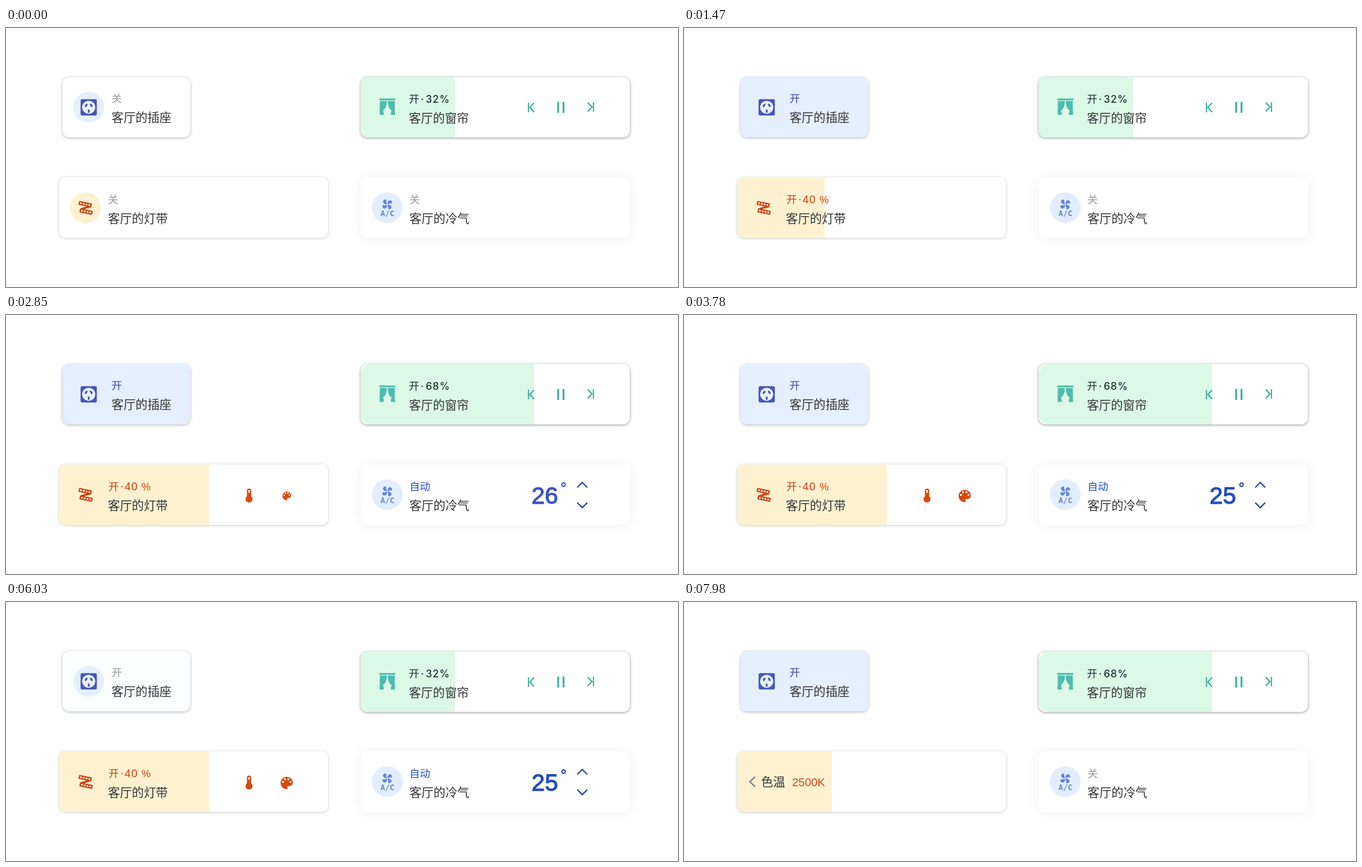
Write an HTML page with a canvas that moves like this. It is 1200 px wide and 464 px high and loops after 8000 ms.

```html
<!DOCTYPE html>
<html lang="zh-CN">
<head>
<meta charset="utf-8">
<title>智能家居卡片</title>
<style>
html, body { margin: 0; width: 100%; height: 100%; overflow: hidden; background: #fff; }
canvas { display: block; width: 1200px; height: 464px; }
</style>
</head>
<body>
<canvas id="stage"></canvas>
<script>
const W = 1200, H = 464, LOOP = 8000, CYCLE = 4800, CUT = 4860;
const canvas = document.getElementById('stage');
const dpr = window.devicePixelRatio || 1;
canvas.width = W * dpr;
canvas.height = H * dpr;
const c = canvas.getContext('2d', { alpha: false });

const CJK = '"Noto Sans CJK SC", "Noto Sans CJK", sans-serif';
const SANS = '"Liberation Sans", Arial, sans-serif';
const INTER = 'Inter, "Liberation Sans", sans-serif';
const MONO = '"DejaVu Sans Mono", monospace';
const INK = '#343436', GREY = '#999', BLUE = '#e4efff', YELLOW = '#fef1d0', MINT = '#dcf9e8';
const TEAL = '#40b09f', RUST = '#cf3f10', NAVY = '#234db8';

const clamp = v => Math.max(0, Math.min(1, v));
const ramp = (t, a, b) => clamp((t - a) / (b - a));
const ease = (t, a, b) => { const k = ramp(t, a, b); return k * k * (3 - 2 * k); };
const mix = (a, b, k) => a + (b - a) * k;

function text(str, x, y, font, color, spacing = 0) {
  c.font = font;
  c.letterSpacing = spacing + 'px';
  c.fillStyle = color;
  c.fillText(str, x, y);
}
const label = (str, x, y) => text(str, x, y, `400 21.4px ${CJK}`, INK);
const status = (str, x, y, color) => text(str, x, y, `400 18.5px ${CJK}`, color);

function disc(x, y, r, color) {
  c.fillStyle = color;
  c.beginPath();
  c.arc(x, y, r, 0, Math.PI * 2);
  c.fill();
}

function line(points, width, color) {
  c.strokeStyle = color;
  c.lineWidth = width;
  c.beginPath();
  points.forEach(([x, y]) => c.lineTo(x, y));
  c.stroke();
}

function box(x, y, w, h, r, color) {
  c.fillStyle = color;
  c.beginPath();
  c.roundRect(x, y, w, h, r);
  c.fill();
}

// White card with a soft shadow; paint() is clipped to its rounded outline.
function card(x, y, w, h, r, shadow, blur, dy, paint) {
  c.save();
  c.shadowColor = `rgba(0,0,0,${shadow})`;
  c.shadowBlur = blur * dpr;
  c.shadowOffsetY = dy * dpr;
  box(x, y, w, h, r, '#fff');
  c.restore();
  c.save();
  c.beginPath();
  c.roundRect(x, y, w, h, r);
  c.clip();
  paint();
  c.restore();
}

function faded(alpha, paint) {
  if (alpha <= 0) return;
  c.save();
  c.globalAlpha *= alpha;
  paint();
  c.restore();
}

function at(x, y, scale, angle, paint) {
  c.save();
  c.translate(x, y);
  c.rotate(angle);
  c.scale(scale, scale);
  paint();
  c.restore();
}

const blade = new Path2D('M.5-10C5-10 5.11-6.43 2.75-5.25C1.76-4.76 1.32-3.71 1.13-2.78L0 0L-1.86-2.35C-3.85-6.04-3.06-10 .5-10Z');
const thermo = new Path2D('M3 1V-7A3 3 0 0 0-3-7V1A5 5 0 1 0 3 1ZM0-8A1 1 0 0 1 1-7V-4H-1V-7A1 1 0 0 1 0-8Z');
const palette = new Path2D('M0-9A9 9 0 0 0-9 0A9 9 0 0 0 0 9A1.5 1.5 0 0 0 1.5 8C1.5 7.6 1.35 7.26 1.1 7C.88 6.73 .73 6.38 .73 6A1.5 1.5 0 0 1 2.23 4.5H4A5 5 0 0 0 9-.5C9-5.42 4.97-9 0-9Z');
[[5.5, -1.5], [2.5, -5.5], [-2.5, -5.5], [-5.5, -1.5]].forEach(([x, y]) => {
  palette.moveTo(x + 1.5, y);
  palette.arc(x, y, 1.5, 0, Math.PI * 2);
});
const drape = new Path2D('M-13.2-10.5H-.8C-1.2-1-3.5 4-8 6.6C-6.8 8.5-6.2 11-6.2 14.5H-13.8Z');

function socketIcon() {
  box(133.2, 127.4, 29, 29.4, 3, '#4656b8');
  disc(147.7, 142.1, 11.7, '#e8f1ff');
  line([[144.6, 136], [141.6, 141.2]], 3.4, '#4656b8');
  line([[150.8, 136], [153.8, 141.2]], 3.4, '#4656b8');
  line([[147.7, 146.2], [147.7, 151.8]], 3.2, '#4656b8');
}

function curtainIcon() {
  box(666.6, 126.2, 28.6, 3.2, 0, '#4dbcad');
  at(680.9, 141.2, 1, 0, () => {
    c.fillStyle = '#4dbcad';
    c.fill(drape);
    c.scale(-1, 1);
    c.fill(drape);
  });
}

function stripIcon() {
  line([[151, 319.5], [133.5, 324.7]], 3.4, RUST);
  [[141.4, 315.6], [143, 329]].forEach(([x, y]) => at(x, y, 1, 0.21, () => {
    box(-11.6, -3.6, 23.2, 7.2, 0.6, RUST);
    for (let i = 0; i < 4; i++) box(-9.3 + i * 5.1, -1.5, 3.2, 3, 0.4, '#fff3dc');
  }));
}

function acIcon() {
  disc(680.8, 321.8, 27.5, '#e2eeff');
  c.fillStyle = '#5f86dc';
  for (let i = 0; i < 4; i++) {
    at(680.8, 316, 0.98, Math.PI / 4 + i * Math.PI / 2, () => c.fill(blade));
  }
  disc(680.8, 316, 1.2, '#e2eeff');
  text('A/C', 668.8, 336.6, `700 13.6px ${MONO}`, '#5f86dc');
}

function socket(t) {
  const on = t >= 1220;
  const k = ramp(t, 1205, 1400);
  card(101, 88, 228, 108, 12, 0.3, 5, 1, () => {
    faded(k, () => box(101, 88, 228, 108, 0, BLUE));
    disc(147.8, 142, 27.5, BLUE);
    socketIcon();
    status(on ? '开' : '关', 188.5, 133, GREY);
    if (on) faded(ramp(t, 1240, 1380), () => status('开', 188.5, 133, '#4656b8'));
    label('客厅的插座', 188.5, 167.5);
  });
}

function curtain(t, dy) {
  const k = ease(t, 1850, 2190);
  const pct = Math.round(mix(32, 68, k));
  c.save();
  c.translate(0, dy);
  card(633.5, 88, 480.5, 108, 12, 0.42, 5, 1, () => {
    const r = mix(12, 18, k);
    box(633.5, 88, mix(168.5, 309.5, k), 108, [r, 0, 0, r], MINT);
    curtainIcon();
    const dark = '#17332f';
    status('开', 719.5, 134, dark);
    disc(743.3, 127.8, 1.3, dark);
    text(pct + '%', 749.5, 134, `500 18px ${INTER}`, dark, 1);
    label('客厅的窗帘', 719.5, 168.5);
    line([[933, 133.7], [933, 151]], 2.2, TEAL);
    line([[943, 134.2], [935.4, 142.4], [943, 150.6]], 2.4, TEAL);
    box(984.3, 132.4, 3.4, 19.6, 0, TEAL);
    box(993.8, 132.4, 3.4, 19.6, 0, TEAL);
    line([[1038.8, 133.6], [1046.4, 141.5], [1038.8, 149.4]], 2.4, TEAL);
    line([[1049, 133], [1049, 150]], 2.2, TEAL);
  });
  c.restore();
}

function strip(t) {
  const on = t >= 1020;
  const temp = ramp(t, 7500, 7650);
  const grow = 156 * ease(t, 1020, 1380) + 111.5 * ease(t, 2200, 2650);
  const fill = mix(grow, 169, ease(t, 7500, 7700));
  card(95, 267.5, 480, 108.5, 11, 0.22, 5, 0.8, () => {
    box(95, 267.5, fill, 109, 0, YELLOW);
    faded(1 - temp, () => {
      disc(141.7, 322, 27.5, YELLOW);
      stripIcon();
      if (on) {
        status('开', 183, 314, RUST);
        disc(207, 307.5, 1.2, RUST);
        text('40', 211.8, 314, `400 19.5px ${SANS}`, RUST, 1);
        text('%', 242, 314, `400 18.5px ${SANS}`, RUST);
      } else {
        status('关', 182, 314, GREY);
      }
      label('客厅的灯带', 182, 348.5);
      c.fillStyle = '#d94a0c';
      const show = ease(t, 2600, 2800);
      if (show > 0) at(434, 323.5, 1.25 * show, 0, () => c.fill(thermo, 'evenodd'));
      const pop = ease(t, 2660, 2960);
      if (pop > 0) at(501.3, 324.2, 1.22 * pop, 0, () => c.fill(palette, 'evenodd'));
    });
    faded(temp, () => {
      line([[127, 313], [117.6, 322], [127, 331]], 2.3, '#777');
      label('色温', 137.8, 330);
      text('2500K', 193, 330, `400 20.4px ${SANS}`, '#d8421a');
    });
  });
}

function aircon(t) {
  const on = ramp(t, 2200, 2320) * (1 - ramp(t, 7600, 7700));
  card(633.5, 267.5, 480.5, 108.5, 12, 0.06, 22, 1, () => {
    acIcon();
    faded(1 - on, () => status('关', 720.5, 314, GREY));
    label('客厅的冷气', 720.5, 348.5);
    faded(on, () => {
      const low = t >= 3750;
      const color = low ? NAVY : '#3d54bd';
      status('自动', 720.5, 314, NAVY);
      text(low ? '25' : '26', 938.5, 337.5, `400 42.5px ${SANS}`, color);
      c.strokeStyle = color;
      c.lineWidth = 1.3;
      c.strokeText(low ? '25' : '26', 938.5, 337.5);
      c.lineWidth = 2.1;
      c.beginPath();
      c.arc(995.6, 304, 3.1, 0, Math.PI * 2);
      c.stroke();
      line([[1020, 309], [1029, 300], [1038, 309]], 2.4, '#2a49a8');
      line([[1020, 336.2], [1029, 345.2], [1038, 336.2]], 2.4, '#2a49a8');
    });
  });
}

function draw(t) {
  c.setTransform(dpr, 0, 0, dpr, 0, 0);
  c.fillStyle = '#fefefe';
  c.fillRect(0, 0, W, H);
  // The upper pair restarts on its own shorter cycle.
  const again = t >= CUT;
  const top = again ? t - CYCLE : t;
  faded(again ? 1 : 1 - 0.65 * ramp(t, 4710, CUT), () => {
    socket(top);
    curtain(top, again ? 1 : 0);
  });
  strip(t);
  aircon(t);
}

const start = performance.now();
function tick() {
  draw((performance.now() - start) % LOOP);
  requestAnimationFrame(tick);
}
tick();
</script>
</body>
</html>
```
